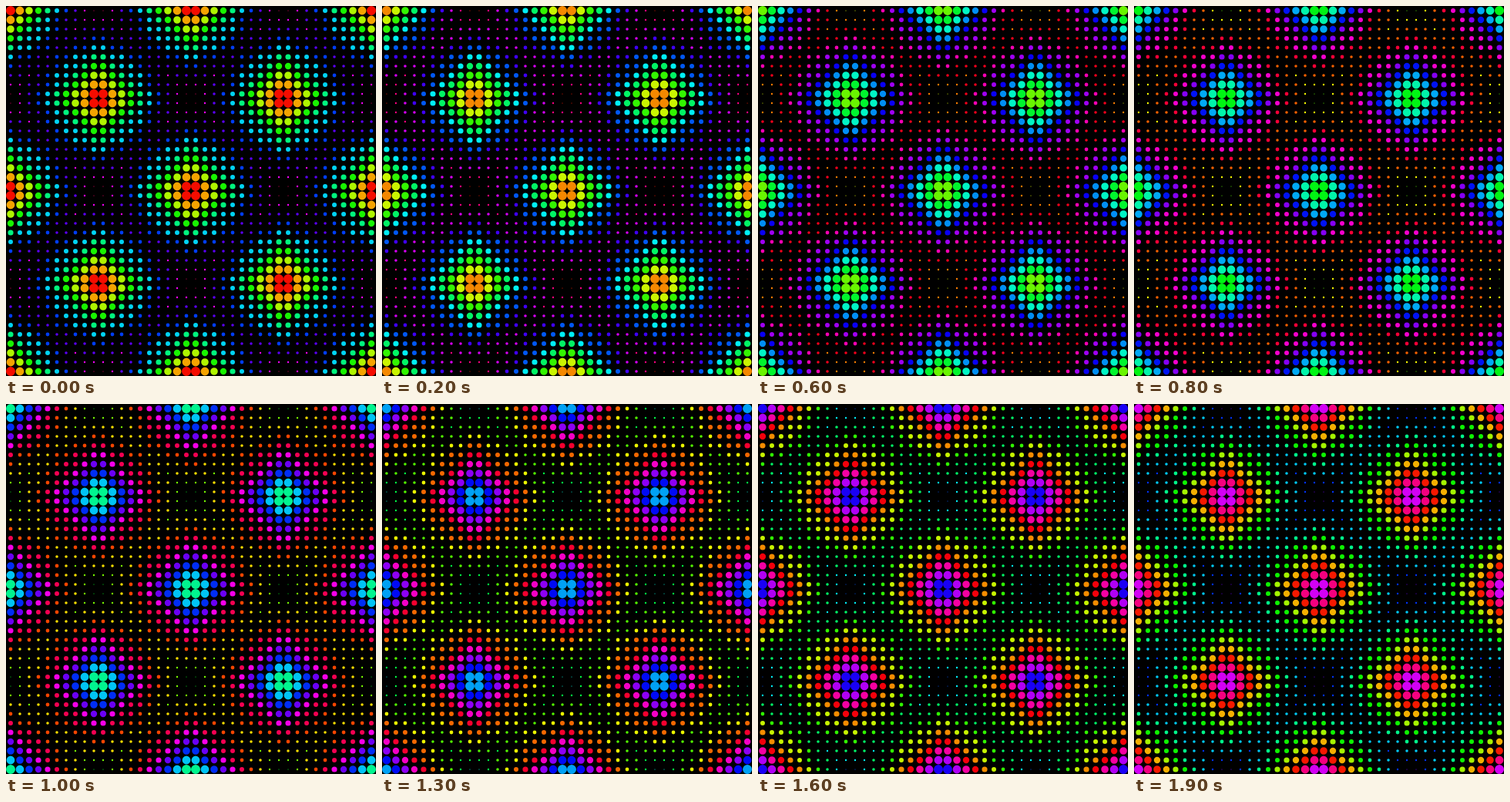
An HTML page with a canvas that plays this animation: 480x480 px, repeating every 2 s.

```html
<!DOCTYPE html>
<html lang="en">
<head>
<meta charset="utf-8">
<style>
html, body { margin: 0; width: 100%; height: 100%; overflow: hidden; background: #000; }
canvas { display: block; width: 480px; height: 480px; }
</style>
</head>
<body>
<canvas id="stage" width="480" height="480"></canvas>
<script>
const ctx = document.getElementById('stage').getContext('2d');
const SIZE = 480, GAP = 12, HALF = 120, LEVELS = 10;
const STEP_MS = 100, STEPS = 20;
const START_HUE = 3, HUE_PER_STEP = 15.2, HUE_PER_LEVEL = 37;

// Triangle wave: 1 at multiples of 240, 0 halfway between them.
const tri = v => Math.abs(v / HALF - 2 * Math.round(v / HALF / 2));
const ramp = v => 1 - tri(v);

// Pyramid-like peaks on a grid of period 240 plus the same grid shifted by half.
const height = (x, y) => Math.max(ramp(x) * ramp(y), tri(x) * tri(y));

const rings = Array.from({ length: LEVELS }, () => []);
for (let y = GAP / 2; y < SIZE; y += GAP) {
  for (let x = GAP / 2; x < SIZE; x += GAP) {
    rings[LEVELS - 1 - Math.floor(height(x, y) * LEVELS)].push([x, y]);
  }
}

function draw(step) {
  ctx.fillStyle = '#000';
  ctx.fillRect(0, 0, SIZE, SIZE);
  rings.forEach((dots, level) => {
    const hue = START_HUE + step * HUE_PER_STEP + level * HUE_PER_LEVEL;
    const radius = 6 - level * 0.6;
    ctx.fillStyle = `hsl(${hue % 360} 100% 48%)`;
    ctx.beginPath();
    for (const [x, y] of dots) {
      ctx.moveTo(x + radius, y);
      ctx.arc(x, y, radius, 0, Math.PI * 2);
    }
    ctx.fill();
  });
}

let shown = -1;
function tick() {
  const step = Math.floor(performance.now() / STEP_MS) % STEPS;
  if (step !== shown) draw(shown = step);
  requestAnimationFrame(tick);
}
tick();
</script>
</body>
</html>
```
